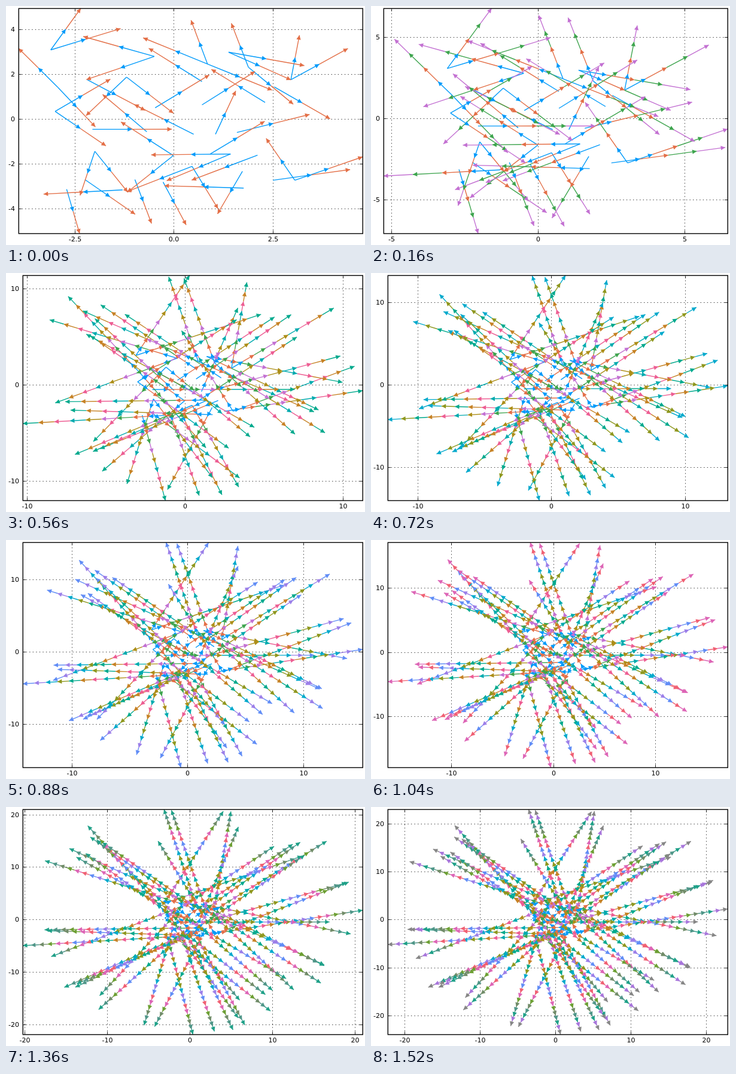
Write an HTML page with a canvas that moves like this. It is 600 px wide and 400 px high and loops after 1600 ms.

```html
<!DOCTYPE html>
<html>
<head>
<meta charset="utf-8">
<style>
html, body { margin: 0; width: 100%; height: 100%; overflow: hidden; background: #fff; }
canvas { display: block; }
</style>
</head>
<body>
<canvas id="stage" width="600" height="400"></canvas>
<script>
const ctx = document.getElementById('stage').getContext('2d');
const STEP_MS = 80, STEPS = 20;
const TOP = 4, RIGHT = 596, BOTTOM = 380.7;

// Start point followed by the headings (degrees) of the walkers that leave from it.
const origins = [
  [-3.1, 3.09, 67.8, 28.4], [.85, 2.46, 144.2, 102, -35.6], [1.38, 2.99, -38.2, -17.4],
  [-2.92, 1.42, 119.7, -61.8], [-2.99, .35, 45.9, -50.2], [-1.99, -1.43, 259.3, -65.5],
  [2.95, 1.76, 83.8, 44.1], [3.05, -2.72, 31.4, 111.2], [1.43, -1.55, 181.1, 216.5],
  [-1.19, 1.88, -53.8, 239.3], [1.88, 2.32, 102.4, -55.6], [-.01, -1.62, 234.6, 131.4],
  [-.49, 2.8, 153.6, 211.1], [.46, -2.1, -70.9, 214.6], [2.53, 1.44, -45.3],
  [.71, 1.68, 132.1], [2.3, .75, 132.6], [.71, .64, 48.1], [1.05, -.67, 75.2],
  [-.47, .51, 47], [-2.18, 1.76, -43.1], [-.68, -.56, 123.8], [.5, -.67, 138.4],
  [-2.05, -.45, .1], [1.59, -.59, 23.7], [.92, -1.55, 46.8], [2.11, -1.6, 213.9],
  [2.5, -2.72, 13.8], [1.73, -2.32, 251.7], [1.76, -3.07, 177], [-.27, -2.8, -73.1],
  [-.98, -2.69, -77.9], [-1.29, -3.15, 185.4], [-2.24, -2.69, -50.7], [-2.7, -3.12, -80.6]
];

// Every walker moves one unit per step in a straight line.
function makeWalker(x, y, degrees) {
  const angle = degrees * Math.PI / 180;
  return { x, y, dx: Math.cos(angle), dy: Math.sin(angle) };
}
const walkers = origins.flatMap(([x, y, ...headings]) => headings.map(h => makeWalker(x, y, h)));

function extent(axis, count) {
  const values = walkers.flatMap(w => [w[axis], w[axis] + count * w['d' + axis]]);
  return [Math.min(...values), Math.max(...values)];
}

function ticksFor([min, max]) {
  const reach = Math.max(-min, max);
  const step = reach < 5 ? 2.5 : reach < 6.3 ? 2 : reach < 10.6 ? 5 : 10;
  const ticks = [];
  for (let i = Math.ceil(min / step); i * step <= max; i++) {
    const value = i * step;
    ticks.push({ value, label: step === 2.5 ? value.toFixed(1) : String(value) });
  }
  return ticks;
}

function line(x1, y1, x2, y2) {
  ctx.beginPath();
  ctx.moveTo(x1, y1);
  ctx.lineTo(x2, y2);
  ctx.stroke();
}

function arrowHead(x1, y1, x2, y2) {
  const length = Math.hypot(x2 - x1, y2 - y1);
  const ux = (x2 - x1) / length, uy = (y2 - y1) / length;
  const bx = x2 - ux * 7.5, by = y2 - uy * 7.5;
  ctx.beginPath();
  ctx.moveTo(x2, y2);
  ctx.lineTo(bx - uy * 3.7, by + ux * 3.7);
  ctx.lineTo(bx + uy * 3.7, by - ux * 3.7);
  ctx.fill();
}

// Dotted grid line plus a short inward tick at each end.
function gridLine(x1, y1, x2, y2) {
  const tx = Math.sign(x2 - x1) * 5, ty = Math.sign(y2 - y1) * 5;
  ctx.setLineDash([1.39, 4.17]);
  line(x1, y1, x2, y2);
  ctx.setLineDash([]);
  line(x1, y1, x1 + tx, y1 + ty);
  line(x2, y2, x2 - tx, y2 - ty);
}

const colors = ('#009afa #e36f47 #3ea44e #c371d2 #ac8e18 #00aaae #ed5e93 #c68225 #00a98d #8e971e #00a9cc ' +
  '#9b7fe9 #618df6 #f06073 #dd65b6 #6c9f33 #718c69 #4f9688 #1fa088 #a876db #868686').split(' ');

function draw(count) {
  const xRange = extent('x', count), yRange = extent('y', count);
  const xTicks = ticksFor(xRange), yTicks = ticksFor(yRange);
  const left = yTicks[0].label.length > 2 ? 28 : 21;
  const px = x => left + (x - xRange[0]) / (xRange[1] - xRange[0]) * (RIGHT - left);
  const py = y => BOTTOM - (y - yRange[0]) / (yRange[1] - yRange[0]) * (BOTTOM - TOP);

  ctx.fillStyle = '#fff';
  ctx.fillRect(0, 0, 600, 400);
  ctx.fillStyle = ctx.strokeStyle = '#000';
  ctx.font = '11px "DejaVu Sans", sans-serif';
  ctx.lineWidth = .8;
  ctx.textAlign = 'center';
  for (const { value, label } of xTicks) {
    const x = Math.round(px(value)) + .5;
    gridLine(x, BOTTOM, x, TOP);
    ctx.fillText(label, x, 394);
  }
  ctx.textAlign = 'right';
  for (const { value, label } of yTicks) {
    const y = Math.round(py(value) - .5) + .5;
    gridLine(left, y, RIGHT, y);
    ctx.fillText(label, left - 6, y + 3.5);
  }

  ctx.lineWidth = 1.39;
  for (const paint of [line, arrowHead]) {
    for (let i = 0; i < count; i++) {
      ctx.strokeStyle = ctx.fillStyle = colors[i];
      for (const { x, y, dx, dy } of walkers) {
        paint(px(x + i * dx), py(y + i * dy), px(x + (i + 1) * dx), py(y + (i + 1) * dy));
      }
    }
  }

  ctx.strokeStyle = '#000';
  ctx.strokeRect(left + .3, TOP + .2, RIGHT - left, BOTTOM - TOP);
}

const start = performance.now();
let shown = -1;
function tick() {
  const step = Math.floor((performance.now() - start) / STEP_MS) % STEPS;
  if (step !== shown) draw((shown = step) + 2);
  requestAnimationFrame(tick);
}
tick();
</script>
</body>
</html>
```
